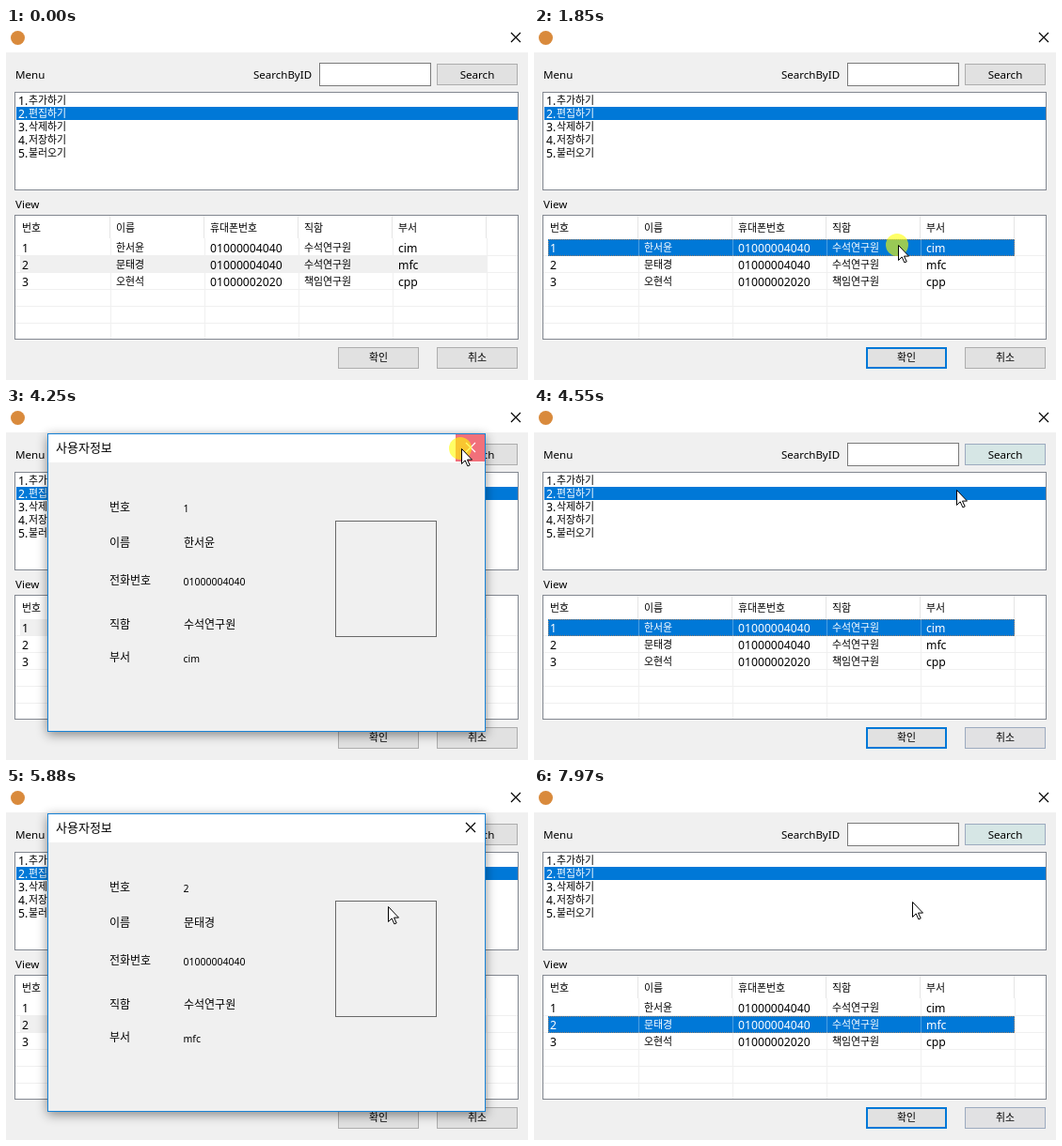
These frames come from a looping animation (555 px wide and 375 px high, 8 s). An HTML page:

```html
<!DOCTYPE html>
<html lang="ko">
<head>
<meta charset="utf-8">
<style>
html, body { margin: 0; width: 100%; height: 100%; overflow: hidden; background: #f0f0f0; }
svg { display: block; }
text { font-family: "Noto Sans", "Open Sans", "Noto Sans CJK KR", sans-serif; }
.ko { font-family: "Noto Sans CJK KR", "Noto Sans CJK", "Noto Sans CJK JP", sans-serif; }
rect { shape-rendering: crispEdges; }
</style>
</head>
<body>
<svg id="stage" width="555" height="375" viewBox="0 0 555 375"></svg>
<script>
const LOOP = 8000, BLUE = '#0078d7';
const menu = ['추가하기', '편집하기', '삭제하기', '저장하기', '불러오기'];
const heads = ['번호', '이름', '휴대폰번호', '직함', '부서'];
const people = [
  ['1', '한서윤', '01000004040', '수석연구원', 'cim'],
  ['2', '문태경', '01000004040', '수석연구원', 'mfc'],
  ['3', '오현석', '01000002020', '책임연구원', 'cpp']
];
// pointer path: time, x, y
const path = [
  [450, 452, 360], [760, 385, 215], [850, 385, 215], [990, 387, 231],
  [2855, 387, 231], [3620, 484, 43], [4450, 484, 43], [4940, 312, 256],
  [5575, 312, 256], [5880, 406, 126], [6420, 475, 54], [6570, 478, 52],
  [7840, 478, 52], [7970, 402, 121]
];
const clicks = [[1850, 1920], [2000, 2150], [4250, 4400], [5090, 5260], [5330, 5500], [7730, 7810]];
const opened = [[2070, 4400, 0], [5330, 7810, 1]];
const FADE = 150;

const isKo = s => /[가-힣]/.test(s);
const fill = (x, y, w, h, c, extra = '') =>
  `<rect x="${x}" y="${y}" width="${w}" height="${h}" fill="${c}" ${extra}/>`;
const frame = (x, y, w, h, c, stroke, extra = '') =>
  fill(x + .5, y + .5, w - 1, h - 1, c, `stroke="${stroke}" ${extra}`);
const text = (s, x, y, size, c = '#000', extra = '') =>
  `<text x="${x}" y="${y}" font-size="${size}" fill="${c}" ${isKo(s) ? 'class="ko"' : ''} ${extra}>${s}</text>`;
const cross = (x, y, c) =>
  `<path d="M${x} ${y}l10 10m0 -10l-10 10" stroke="${c}" stroke-width="1.2" fill="none"/>`;
const mid = 'text-anchor="middle"';
const cell = (s, x, y, c) => isKo(s) ? text(s, x, y - .5, 10.9, c) : text(s, x, y, 12.2, c);

function button(s, x, y, c = '#e1e1e1', edge = '#adadad', thick = 1) {
  const i = thick - 1;
  return fill(x, y, 86, 23, edge) + fill(x + 1 + i, y + 1 + i, 84 - 2 * i, 21 - 2 * i, c) +
    text(s, x + 43, y + (isKo(s) ? 15 : 16), isKo(s) ? 10.9 : 11.6, '#000', mid);
}

function pointer(t) {
  if (t < path[0][0]) return null;
  const i = path.findIndex(p => p[0] > t);
  if (i < 0) return path[path.length - 1].slice(1);
  const [t0, x0, y0] = path[i - 1], [t1, x1, y1] = path[i];
  const k = (t - t0) / (t1 - t0);
  return [x0 + (x1 - x0) * k, y0 + (y1 - y0) * k];
}

function mainWindow(t, open, pos) {
  let s = fill(0, 0, 555, 375, '#f0f0f0') + fill(0, 0, 555, 26, '#fff') +
    '<circle cx="12.5" cy="10.5" r="7.5" fill="#d98a3c"/>' + cross(537, 5, '#000') +
    text('Menu', 10, 53.5, 11.6) + text('SearchByID', 263, 53.5, 11.5) +
    frame(333, 37, 119, 25, '#fff', '#7a7a7a');

  const returned = t >= 4400 && !open;
  const lit = returned && (t < 4750 || t >= 7810);
  s += button('Search', 458, 38, lit ? '#d6e6e5' : '#e1e1e1', returned ? '#9caabf' : '#adadad');

  s += frame(9, 68, 536, 105, '#fff', '#828790') + fill(11, 84, 533, 14, BLUE);
  menu.forEach((m, i) => {
    const c = i == 1 ? '#fff' : '#000', y = 81.5 + 14 * i;
    s += text(i + 1 + '.', 13, y, 12.2, c) + text(m, 24, y - .5, 10.9, c);
  });

  s += text('View', 10, 191.5, 11.6) + frame(9, 199, 536, 133, '#fff', '#828790');
  if (pos && !open && pos[1] > 200 && pos[1] < 224) {
    const col = Math.floor((pos[0] - 11) / 100);
    if (col >= 0 && col < 5) s += fill(11 + col * 100, 201, 100, 23, '#d9ebf9');
  }
  for (let y = 242; y < 330; y += 18) s += fill(10, y, 534, 1, '#f0f0f0');
  heads.forEach((h, i) => {
    s += fill(110 + 100 * i, 200, 1, 24, '#e5e5e5') + fill(111 + 100 * i, 224, 1, 107, '#f0f0f0') +
      text(h, 17 + 100 * i, 216.5, 10.9);
  });

  const active = t >= 1850 && !open;
  const picked = t >= 1850 && t < 5090 ? 0 : 1;
  people.forEach((p, r) => {
    const y = 225 + 18 * r, on = r == picked;
    if (on) s += fill(15, y, 496, 18, active ? BLUE : '#f0f0f0');
    if (on && active) s += frame(15, y, 496, 18, 'none', '#ff8728', 'stroke-dasharray="1 1" opacity=".6"') +
      [111, 211, 311, 411].map(x => fill(x, y, 1, 18, '#4c9fe2')).join('');
    p.forEach((v, i) => s += cell(v, 17 + 100 * i, y + 13.5, on && active ? '#fff' : '#000'));
  });

  return s + (active ? button('확인', 353, 340, '#e1e1e1', BLUE, 2) : button('확인', 353, 340)) +
    (returned ? button('취소', 458, 340, '#e1e1e3', '#9caabf') : button('취소', 458, 340));
}

function dialog(person, alpha, closeColor) {
  const ys = [105, 143, 183, 230, 265];
  const labels = ['번호', '이름', '전화번호', '직함', '부서'];
  let s = `<g opacity="${alpha}"><g filter="url(#shadow)">` + fill(44, 27, 466, 318, '#f0f0f0') + '</g>' +
    frame(44, 27, 466, 318, '#f0f0f0', '#1883d7') + fill(45, 28, 464, 30, '#fff') +
    text('사용자정보', 53, 46.5, 13);
  if (closeColor) s += fill(478, 28, 31, 29, closeColor);
  s += cross(489, 37, closeColor ? '#fff' : '#000') + frame(350, 120, 108, 124, 'none', '#696969');
  labels.forEach((l, i) => {
    const v = person[i];
    s += text(l, 110, ys[i] + 4.5, 12) +
      (isKo(v) ? text(v, 189, ys[i] + 4.5, 12) : text(v, 188.5, ys[i] + 6, 10.5));
  });
  return s + '</g>';
}

const defs = `<defs><filter id="shadow" x="-10%" y="-10%" width="120%" height="125%">
  <feDropShadow dx="0" dy="3" stdDeviation="6" flood-color="#000" flood-opacity=".45"/></filter></defs>`;
const stage = document.getElementById('stage');

function draw(t) {
  const pos = pointer(t);
  const shown = opened.find(([a, b]) => t >= a && t < b + FADE);
  const open = shown && t < shown[1];
  const pressed = clicks.some(([a, b]) => t >= a && t < b);
  let s = defs + mainWindow(t, open, pos);

  if (shown) {
    const over = pos[0] >= 477 && pos[1] < 57;
    const alpha = open ? 1 : 1 - (t - shown[1]) / FADE;
    s += dialog(people[shown[2]], alpha, over && (pressed ? '#f1707a' : '#e81123'));
  }
  if (pos) {
    const [x, y] = pos.map(Math.round);
    if (pressed) s += `<circle cx="${x - 1}" cy="${y}" r="12" fill="#ff0" opacity=".6"/>`;
    s += `<path transform="translate(${x} ${y})" d="M.5 .5v16l3.7-3.6 2.7 6 2.3-1-2.7-5.8h5z" fill="#fff" stroke="#000"/>`;
  }
  stage.innerHTML = s;
}

const start = performance.now();
function tick() {
  draw((performance.now() - start) % LOOP);
  requestAnimationFrame(tick);
}
tick();
</script>
</body>
</html>
```
